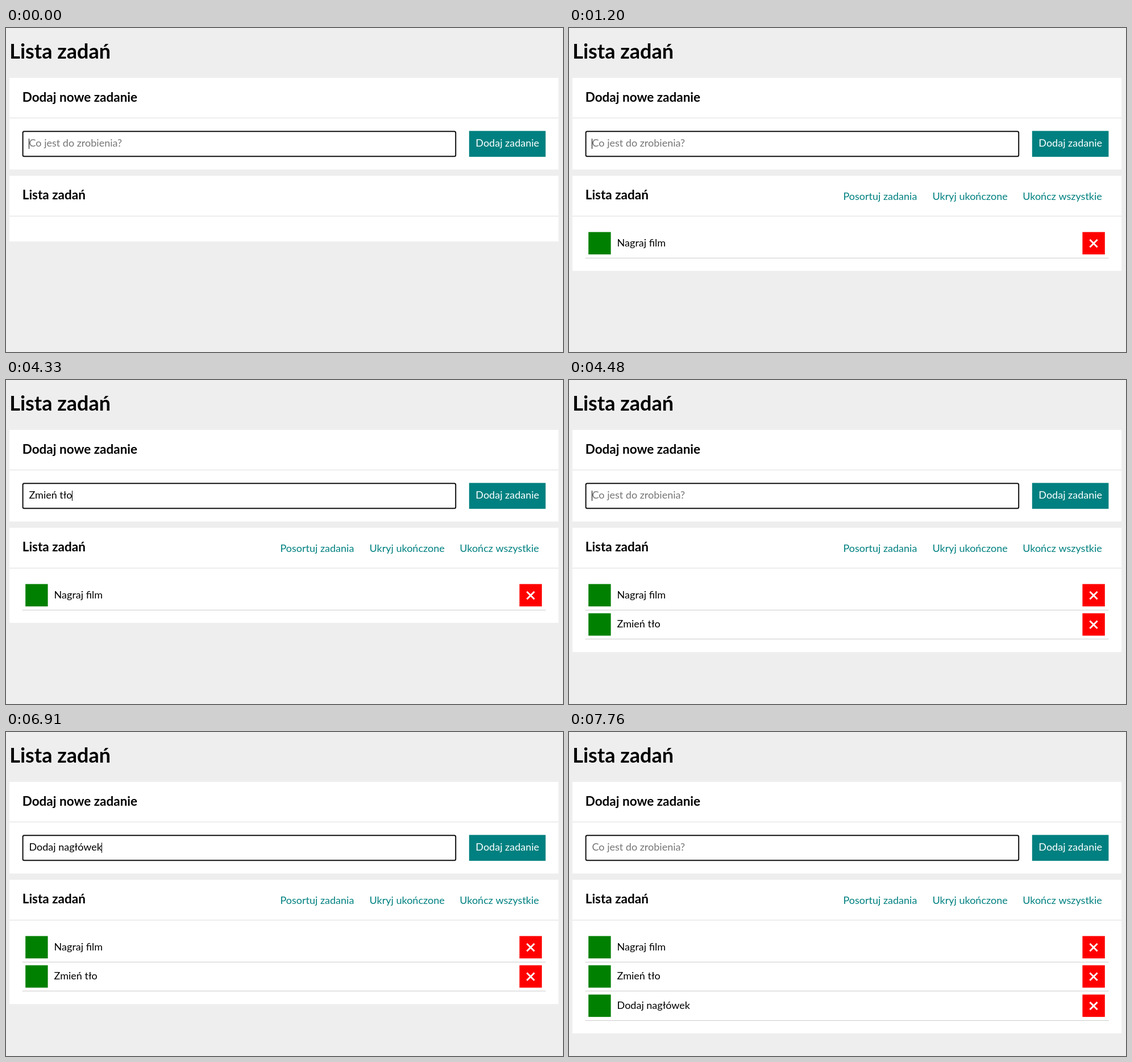
Write an HTML page with a canvas that moves like this. It is 980 by 571 pixels and loops after 8000 ms.

```html
<!DOCTYPE html>
<html lang="pl">
<head>
<meta charset="utf-8">
<title>Lista zadań</title>
<style>
  html, body { margin: 0; width: 100%; height: 100%; overflow: hidden; background: #eee; }
  canvas { display: block; }
</style>
</head>
<body>
<canvas id="stage" width="980" height="571"></canvas>
<script>
const ctx = document.getElementById('stage').getContext('2d');
const LOOP = 8000;
const BODY = 18, HEADING = 22.5, TITLE = 36;
const PAD = 22.5, ROW = 51.55, BOX = 39.4;
const LEFT = 6.2, RIGHT = 972;
const TASKS = ['Nagraj film', 'Zmień tło', 'Dodaj nagłówek'];

// Each entry: [time, tasks in the list, characters typed, caret hidden]
const events = [[0, 0, 0]];

function type(task, counts, from, to) {
  const step = counts.length > 1 ? (to - from) / (counts.length - 1) : 0;
  counts.forEach((n, i) => events.push([from + i * step, task, n]));
}

type(0, [1, 2, 4, 5, 7, 8, 10, 11], 70, 820);
events.push([1200, 1, 0], [1750, 1, 0, true]);
type(1, [1], 2150, 2150);
events.push([2700, 1, 1, true]);
type(1, [2, 3, 4, 5, 6, 7, 8], 3160, 4100);
type(1, [9], 4330, 4330);
events.push([4480, 2, 0], [5030, 2, 0, true]);
type(2, [1, 2, 3, 4, 5, 6, 7, 8, 9], 5430, 6360);
type(2, [10, 11, 12, 13, 14], 6510, 6910);
events.push([7210, 3, 0], [7760, 3, 0, true]);

function rect(x, y, w, h, color) {
  ctx.fillStyle = color;
  ctx.fillRect(x, y, w, h);
}

function text(str, x, y, { size = BODY, color = '#000', bold = false, align = 'left' } = {}) {
  ctx.font = `${bold ? 700 : 400} ${size}px Lato, sans-serif`;
  ctx.fillStyle = color;
  ctx.textAlign = align;
  ctx.fillText(str, x, y);
}

function panel(title, top, height, baseline) {
  rect(LEFT, top, RIGHT - LEFT, height, '#fff');
  rect(LEFT, Math.round(top + 70), RIGHT - LEFT, 1, '#ddd');
  text(title, LEFT + PAD, baseline, { size: HEADING, bold: true });
}

function input(value, caret) {
  ctx.strokeStyle = '#101010';
  ctx.lineWidth = 2;
  ctx.beginPath();
  ctx.roundRect(29.6, 182.2, 761.6, 44, 2.5);
  ctx.stroke();

  const x = 40.5;
  if (value) text(value, x, 209.4);
  else text('Co jest do zrobienia?', x, 209.4, { color: '#757575' });
  if (caret) rect(Math.floor(x + ctx.measureText(value).width), 195, 1, 18, '#000');
}

function cross(x, y) {
  const r = 6.6;
  ctx.strokeStyle = '#fff';
  ctx.lineWidth = 3;
  ctx.beginPath();
  ctx.moveTo(x - r, y - r);
  ctx.lineTo(x + r, y + r);
  ctx.moveTo(x + r, y - r);
  ctx.lineTo(x - r, y + r);
  ctx.stroke();
}

function row(name, i) {
  const y = 359.6 + i * ROW;
  rect(34.2, y, BOX, BOX, '#008000');
  text(name, 84.6, Math.round(y + 25));
  rect(903.4, y, BOX, BOX, '#f00');
  cross(923, y + 20);
  rect(LEFT + PAD, Math.round(y + 45), RIGHT - LEFT - 2 * PAD, 1, '#ccc');
}

function draw(t) {
  const [, done, typed, hidden] = events.findLast(e => e[0] <= t + 0.01);

  rect(0, 0, 980, 571, '#eee');
  text('Lista zadań', LEFT, 54, { size: TITLE, bold: true });

  panel('Dodaj nowe zadanie', 88, 161.4, 129.5);
  input(typed ? TASKS[done].slice(0, typed) : '', !hidden);
  rect(814.8, 181.4, 134.6, 45.6, '#008080');
  text('Dodaj zadanie', 882.2, 209.4, { color: '#fff', align: 'center' });

  panel('Lista zadań', 260.5, done ? 115.9 + done * ROW : 115.7, 302);
  if (done) {
    const link = { color: '#008080', align: 'center' };
    text('Posortuj zadania', 547.4, 302.7, link);
    text('Ukryj ukończone', 705.6, 302.7, link);
    text('Ukończ wszystkie', 868, 302.7, link);
  }
  TASKS.slice(0, done).forEach(row);
}

function frame() {
  draw(performance.now() % LOOP);
  requestAnimationFrame(frame);
}
frame();
</script>
</body>
</html>
```
